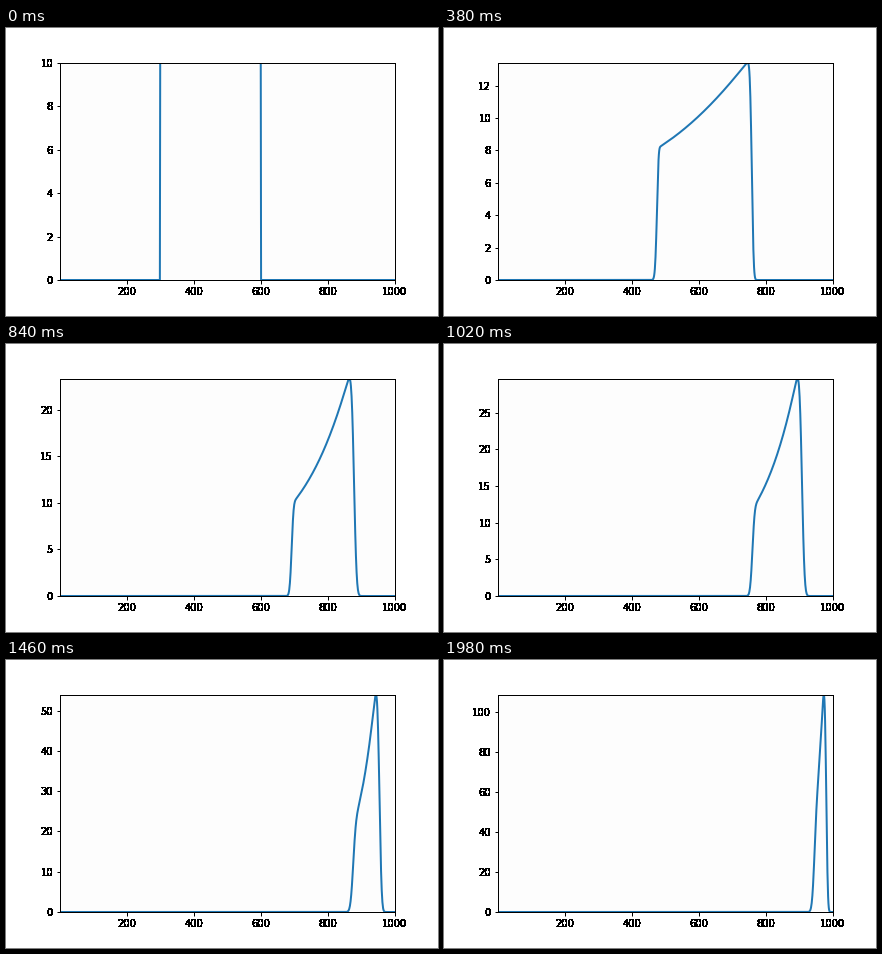
Write a matplotlib script that moves like this. It is 432 px wide and 288 px high and loops after 2000 ms.

```python
import numpy as np
import matplotlib.pyplot as plt
from matplotlib.animation import FuncAnimation

CELLS = 1000
FRAMES = 100
STEPS = 10            # solver steps per frame
DT = 1 / (FRAMES * STEPS)

cell = np.arange(1, CELLS + 1)
speed = np.sin(np.pi * cell / CELLS)


def advect(n):
    """One conservative upwind step of n_t + (speed * n)_x = 0."""
    flux = speed * n * DT * CELLS
    n = n - flux
    n[1:] += flux[:-1]
    return n


def solve():
    n = np.where((cell >= 300) & (cell <= 600), 10.0, 0.0)
    history = [n]
    for _ in range(FRAMES - 1):
        for _ in range(STEPS):
            n = advect(n)
        history.append(n)
    return history


def harden(img, dpi):
    """Turn every touched pixel solid black."""
    out = np.zeros_like(img)
    out[..., 3] = img[..., 3] > 0.02
    return out, 0, 0


history = solve()

plt.rcParams["font.family"] = "DejaVu Sans"
plt.rcParams["axes.linewidth"] = 1
fig, ax = plt.subplots(figsize=(6, 4), dpi=72)
fig.subplots_adjust(left=0.125, right=0.9, bottom=0.125, top=0.88)
ax.set_facecolor("#fdfdfd")
ax.tick_params(width=1, labelsize=10)
ax.set_xlim(1, CELLS)
line, = ax.plot([], [], color="#1f77b4", lw=2)


def update(i):
    n = history[i]
    line.set_data(cell, n)
    ax.set_ylim(0, n.max())
    for label in ax.get_xticklabels() + ax.get_yticklabels():
        label.set_agg_filter(harden)
    return line,


anim = FuncAnimation(fig, update, frames=FRAMES, interval=20,
                     init_func=lambda: update(0), repeat=True, repeat_delay=0)
plt.show()
```
